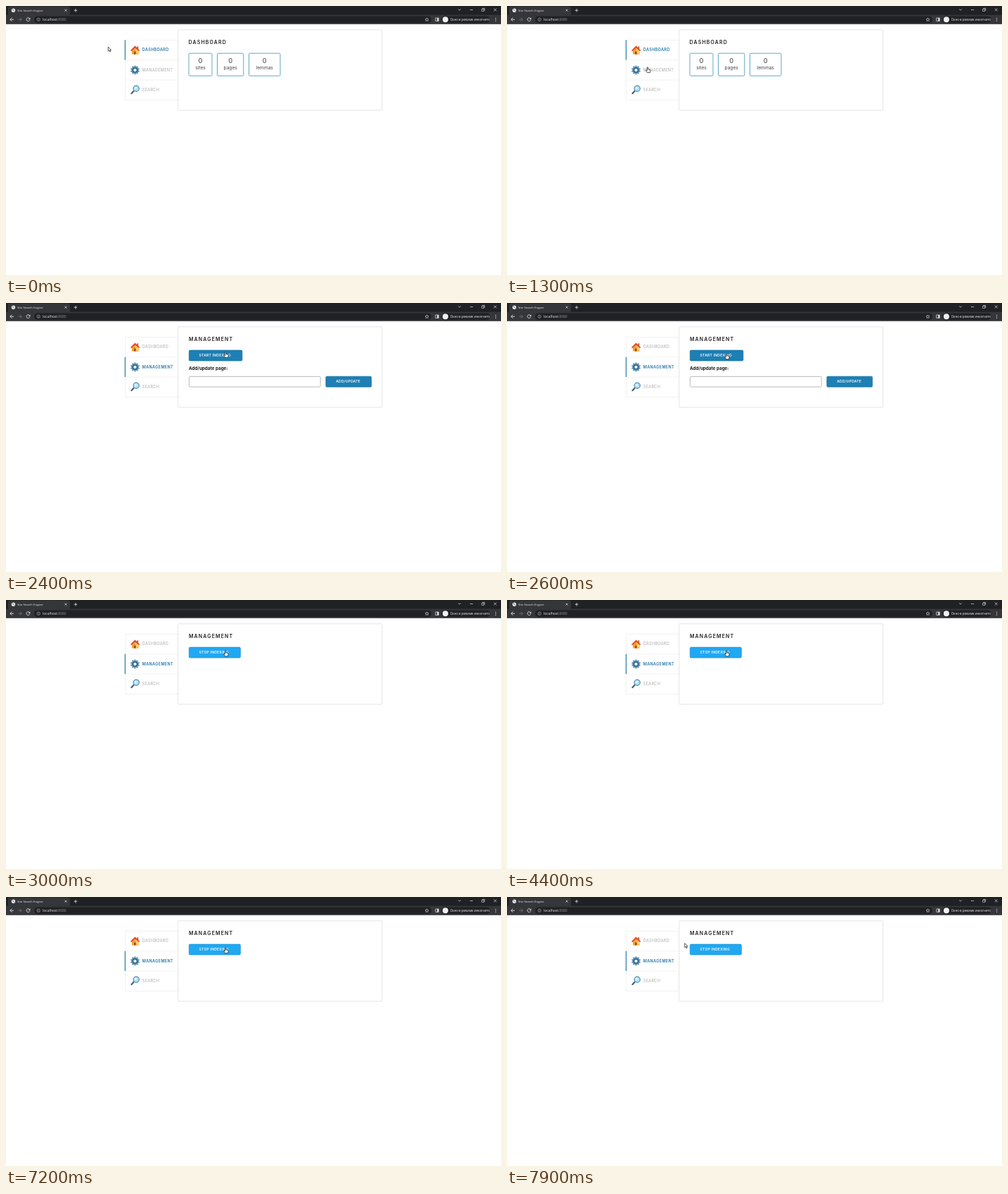
Write an HTML page with a canvas that moves like this. It is 704 px wide and 382 px high and loops after 8000 ms.

```html
<!DOCTYPE html>
<html lang="en">
<head>
<meta charset="utf-8">
<title>Site Search Engine</title>
<style>
html, body { margin: 0; width: 100%; height: 100%; overflow: hidden; background: #fff; }
canvas { display: block; width: 704px; height: 382px; }
</style>
</head>
<body>
<canvas id="stage"></canvas>
<script>
const W = 704, H = 382, LOOP = 8000, STEP = 100;
const canvas = document.getElementById('stage');
const ctx = canvas.getContext('2d');
const dpr = window.devicePixelRatio || 1;
canvas.width = W * dpr;
canvas.height = H * dpr;

const UI = '"Open Sans", sans-serif';
const PAGE = 'Inter, sans-serif';
const BLUE = '#1d7fb4';

// Pointer tip: time, x, y
const path = [
  [0, 145.3, 58], [600, 145.3, 58], [1200, 202, 87], [1300, 200, 86.4],
  [1700, 200, 86.4], [2400, 312.4, 69.2], [2600, 312.2, 71.6],
  [7000, 312.2, 71.6], [7100, 310, 71], [7200, 312.2, 71.6],
  [7400, 312.2, 71.6], [7900, 252.8, 65.6], [8000, 252.8, 65.6]
];

function rect(x, y, w, h, fill) {
  ctx.fillStyle = fill;
  ctx.fillRect(x, y, w, h);
}

function box(x, y, w, h, r, fill, stroke, lw = 1) {
  ctx.beginPath();
  ctx.roundRect(x, y, w, h, r);
  if (fill) { ctx.fillStyle = fill; ctx.fill(); }
  if (stroke) { ctx.strokeStyle = stroke; ctx.lineWidth = lw; ctx.stroke(); }
}

function disc(x, y, r, fill) {
  ctx.beginPath();
  ctx.arc(x, y, r, 0, 7);
  ctx.fillStyle = fill;
  ctx.fill();
}

function ring(x, y, r, color, lw) {
  ctx.beginPath();
  ctx.arc(x, y, r, 0, 7);
  ctx.strokeStyle = color;
  ctx.lineWidth = lw;
  ctx.stroke();
}

function poly(points, fill) {
  ctx.beginPath();
  for (let i = 0; i < points.length; i += 2) ctx.lineTo(points[i], points[i + 1]);
  ctx.closePath();
  ctx.fillStyle = fill;
  ctx.fill();
}

function line(d, color, lw = 0.8) {
  ctx.strokeStyle = color;
  ctx.lineWidth = lw;
  ctx.stroke(new Path2D(d));
}

function text(s, x, y, size, color, { weight = 400, gap = 0, align = 'left', face = PAGE } = {}) {
  ctx.font = `${weight} ${size}px ${face}`;
  ctx.letterSpacing = gap + 'px';
  ctx.textAlign = align;
  ctx.fillStyle = color;
  ctx.fillText(s, x, y);
}

function drawBrowser() {
  const ink = '#e4e5e7';
  rect(0, 0, W, 13, '#202124');
  box(3, 0.5, 88, 14, [3, 3, 0, 0], '#35363a');
  rect(0, 12.6, W, 13.2, '#35363a');

  disc(10.5, 6.2, 2.7, '#eceded');
  line('M9 5 l1.6 .5 l-.4 1.4 M11.4 7.6 l.9 -1.1', '#55575b', 0.8);
  text('Site Search Engine', 16, 7.9, 4.3, '#e8eaed', { face: UI });
  line('M83.5 4.6 l3 3 m0 -3 l-3 3', ink, 0.7);
  line('M96.7 6.2 h4.6 M99 3.9 v4.6', ink, 0.8);

  line('M643.2 4.5 l1.8 1.6 l1.8 -1.6', ink, 0.7);
  line('M660 5.5 h4', ink, 0.7);
  line('M676.6 4.4 h3 v3 h-3 z M677.7 4.2 v-.9 h3 v3 h-.9', ink, 0.6);
  line('M693.8 3.5 l3.8 3.8 m0 -3.8 l-3.8 3.8', ink, 0.7);

  line('M11 19.2 h-5 M8.3 16.7 l-2.5 2.5 l2.5 2.5', ink, 0.9);
  line('M17.2 19.2 h5 M19.9 16.7 l2.5 2.5 l-2.5 2.5', '#77797d', 0.8);
  line('M33.4 17.7 a2.4 2.4 0 1 0 .4 2', ink, 0.9);
  poly([34.3, 16.4, 34.3, 18.9, 31.9, 18.9], ink);

  box(40, 14.4, 565, 9.8, 4.9, '#202124');
  ring(46.2, 19.2, 2.2, '#b9bbbf', 0.6);
  line('M46.2 18.9 v1.5 M46.2 17.8 v.6', '#b9bbbf', 0.6);
  text('localhost', 52, 21, 5, '#e8eaed', { face: UI });
  const host = ctx.measureText('localhost').width;
  text(':8080', 52 + host, 21, 5, '#8f9297', { face: UI });

  line('M598.6 16.8 l.7 1.6 l1.8 .2 l-1.3 1.2 l.4 1.7 l-1.6 -.9 l-1.6 .9 l.4 -1.7 l-1.3 -1.2 l1.8 -.2 z', ink, 0.6);
  line('M610.8 17 h4.4 v4.4 h-4.4 z', ink, 0.7);
  rect(613.2, 17, 2, 4.4, ink);
  box(619.5, 14.4, 69, 9.8, 4.9, '#202124');
  disc(624.9, 19.2, 4, '#eef0f2');
  text('Окно в режиме инкогнито', 631.8, 20.8, 4.4, '#e8eaed', { face: UI });
  for (const y of [17.3, 19.3, 21.3]) disc(696.5, y, 0.6, ink);
}

function drawHouse() {
  rect(186.4, 57.3, 1.8, 4, '#c5542a');
  poly([179, 62.5, 183.5, 58.8, 188.3, 62.5, 188.3, 68.6, 179, 68.6], '#f3a32f');
  poly([183.8, 59, 188.6, 62.6, 188.6, 68.6, 184.6, 68.6], '#f8c354');
  poly([177, 63, 183.5, 56.6, 190.3, 63, 189.2, 64, 183.5, 59.6, 178.2, 64.2], '#e2482a');
  rect(182, 64.6, 2.6, 4, '#a8452a');
  rect(185.8, 64.2, 1.8, 1.8, '#fbe6ad');
}

function drawGear() {
  for (let i = 0; i < 10; i++) {
    ctx.save();
    ctx.translate(183.5, 91);
    ctx.rotate(i * Math.PI / 5);
    rect(-1.1, -6.4, 2.2, 3, '#5b91b6');
    ctx.restore();
  }
  disc(183.5, 91, 5.1, '#5d9cc8');
  ring(183.5, 91, 3.2, '#32566f', 1.3);
  disc(183.5, 91, 2.1, '#e6eef3');
}

function drawLens() {
  ctx.lineCap = 'round';
  line('M181.6 120.8 L178.4 124.2', '#43627a', 2.2);
  ctx.lineCap = 'butt';
  disc(185.2, 117.3, 4.1, '#b5e0f4');
  disc(184.2, 116.2, 1.8, '#dcf3fc');
  ring(185.2, 117.3, 4.1, '#4e8fae', 1.2);
}

function drawMenu(t) {
  const active = t < 1700 ? 0 : 1;
  const fade = active ? Math.min(1, (t - 1600) / 200) : 1;
  box(169.5, 48.5, 75.5, 85, 0, null, '#efefef', 0.8);
  rect(170, 76.5, 75, 0.7, '#eeeeee');
  rect(170, 104.7, 75, 0.7, '#eeeeee');
  ctx.globalAlpha = fade;
  rect(168.8, active ? 76.8 : 48.3, 1.2, 28.2, '#2a7ca6');
  ctx.globalAlpha = 1;
  drawHouse();
  drawGear();
  drawLens();
  ['DASHBOARD', 'MANAGEMENT', 'SEARCH'].forEach((label, i) => {
    const on = i === active;
    text(label, 193.8, 64.4 + i * 28.3, 5.5, on ? '#2878a6' : '#a9a9a9',
      { weight: on ? 600 : 400, gap: 0.35 });
  });
}

function drawStat(x, w, label) {
  box(x, 67.2, w, 32, 1.5, '#fff', '#4f9dbf', 0.9);
  text('0', x + w / 2, 81.2, 9.4, '#3a3a3a', { align: 'center' });
  text(label, x + w / 2, 90.4, 6.6, '#444', { align: 'center' });
}

function drawButton(x, y, w, label, fill, edge) {
  box(x, y, w, 15, 1.5, fill, edge, 0.7);
  text(label, x + 14.3, y + 9.1, 5, '#f4fafd', { weight: 600, gap: 0.25 });
}

function drawPanel(t) {
  box(244.8, 33.8, 290, 114.3, 1, '#fff', '#e2e2e2', 0.9);
  const dash = t < 1700;
  text(dash ? 'DASHBOARD' : 'MANAGEMENT', dash ? 259.6 : 260, 54.4, 7, '#222',
    { weight: 600, gap: 1.15 });
  if (dash) {
    drawStat(260, 33, 'sites');
    drawStat(300.5, 37.3, 'pages');
    drawStat(345.5, 44.5, 'lemmas');
  } else if (t < 3000) {
    drawButton(260.3, 67.1, 75.6, 'START INDEXING', BLUE, '#176d9c');
    text('Add/update page:', 260, 94.9, 6.3, '#1c1c1c', { weight: 700 });
    box(260.4, 104.4, 186.8, 14.7, 1.5, '#fff', '#b4b4b4', 0.9);
    drawButton(454.9, 104.2, 64.8, 'ADD/UPDATE', BLUE, '#176d9c');
  } else {
    drawButton(260.3, 67.1, 73.1, 'STOP INDEXING', '#20a8f2', '#1a8fd0');
  }
}

function pointerAt(t) {
  const i = path.findIndex(p => p[0] > t);
  const [t0, x0, y0] = path[i - 1], [t1, x1, y1] = path[i];
  const u = (t - t0) / (t1 - t0);
  const k = u * u * (3 - 2 * u);
  return [x0 + (x1 - x0) * k, y0 + (y1 - y0) * k];
}

const arrow = new Path2D('M0 0 V6.2 L1.4 4.9 L2.4 7.1 L3.4 6.6 L2.4 4.5 H4.3 Z');
const hand = new Path2D('M-.7 .7 Q0 -.3 .6 .7 V3.2 L3 3.7 Q4 3.9 3.9 5 L3.4 8.2 H-.6 ' +
  'L-2.5 5.2 Q-2.5 4.2 -1.6 4.6 L-.7 5.4 Z');

function drawPointer(t) {
  const [x, y] = pointerAt(t);
  const onMenu = x > 169 && x < 245 && y > 48 && y < 134;
  const onButton = t >= 1700 && x > 260 && x < 336 && y > 67 && y < 82;
  ctx.save();
  ctx.translate(x, y);
  ctx.lineJoin = 'round';
  ctx.lineWidth = 0.75;
  ctx.strokeStyle = '#222';
  ctx.fillStyle = '#fff';
  const shape = onMenu || onButton ? hand : arrow;
  ctx.fill(shape);
  ctx.stroke(shape);
  if (shape === hand) line('M1.6 3.6 v1.4 M2.8 3.9 v1.2', '#555', 0.4);
  ctx.restore();
}

function draw(t) {
  ctx.setTransform(dpr, 0, 0, dpr, 0, 0);
  rect(0, 0, W, H, '#fff');
  drawBrowser();
  drawMenu(t);
  drawPanel(t);
  drawPointer(t);
}

const start = performance.now();
function tick() {
  const t = (performance.now() - start) % LOOP;
  draw(Math.floor(t / STEP) * STEP);
  requestAnimationFrame(tick);
}
tick();
</script>
</body>
</html>
```
